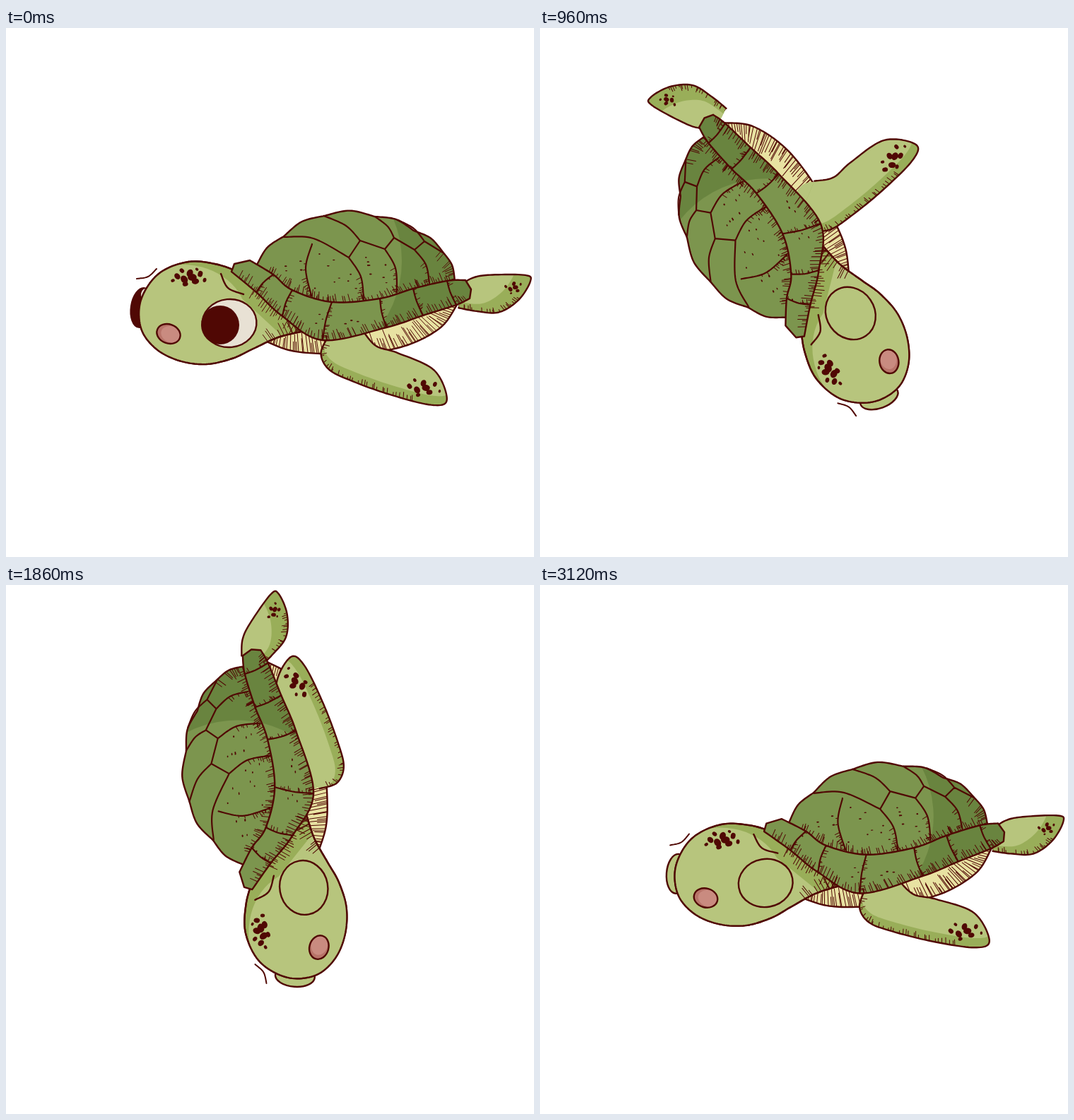
Recreate the animation shown at these times as an HTML page with a canvas. Size 747 px wide and 749 px high, loop 3180 ms.

```html
<!DOCTYPE html>
<html>
<head>
<meta charset="utf-8">
<title>Tumbling turtle</title>
<style>
html, body { margin: 0; width: 100%; height: 100%; overflow: hidden; background: #fff; }
canvas { display: block; }
</style>
</head>
<body>
<canvas id="stage" width="747" height="749"></canvas>
<script>
const ctx = document.getElementById('stage').getContext('2d');
const INK = '#500804', SKIN = '#b7c57d', SKIN_DARK = '#99ae59', SHELL = '#7c954e',
  SHELL_DARK = '#69843f', BELLY = '#e8e2a2', WHITE = '#e8e1d4';
const LOOP = 3180, STEP = 60;

let seed = 7;
const rnd = () => (seed = seed * 16807 % 2147483647) / 2147483647;
const points = s => s.split(',').map(p => p.trim().split(' ').map(Number));

// Smooth curve through a few points, as a dense list of points
function spline(p) {
  const out = [];
  for (let i = 0; i < p.length - 1; i++) {
    const a = p[i - 1] || p[i], b = p[i], c = p[i + 1], d = p[i + 2] || c;
    for (let u = 0; u <= 1; u += 1 / 12)
      out.push([0, 1].map(k => b[k] + u / 2 * (c[k] - a[k]
        + u * (2 * a[k] - 5 * b[k] + 4 * c[k] - d[k] + u * (3 * (b[k] - c[k]) + d[k] - a[k])))));
  }
  return [...out, p.at(-1)];
}
const curve = s => spline(points(s));
const path = line => new Path2D('M' + line.join('L'));

// Row of arcs bulging outwards between the nodes
const scallops = nodes => nodes.slice(1).flatMap(([x, y], i) => {
  const [px, py] = nodes[i], bulge = .11;
  return spline([[px, py], [(px + x) / 2 + (y - py) * bulge, (py + y) / 2 - (x - px) * bulge], [x, y]]);
});

// Pen strokes standing on a part of a line; the sign of len picks the side
function fringe(line, len, from = 0, to = 1, gap = 5) {
  const ink = new Path2D(), last = line.length - 1;
  for (let i = Math.floor(from * last); i < to * last; i++) {
    const [x, y] = line[i], dx = line[i + 1][0] - x, dy = line[i + 1][1] - y;
    const size = Math.hypot(dx, dy);
    for (let n = Math.floor(size / gap + rnd()); n > 0; n--) {
      const u = rnd(), l = len * (.3 + .7 * rnd()) / size;
      ink.moveTo(x + dx * u, y + dy * u);
      ink.lineTo(x + dx * u - dy * l + dx * l * .2, y + dy * u + dx * l + dy * l * .2);
    }
  }
  return ink;
}
function join(...parts) {
  const all = new Path2D();
  parts.forEach(p => all.addPath(p));
  return all;
}
function moved(p, x, y) {
  const copy = new Path2D();
  copy.addPath(p, new DOMMatrix([1, 0, 0, 1, x, y]));
  return copy;
}
function oval(x, y, rx, ry, turn = 0) {
  const p = new Path2D();
  p.ellipse(x, y, rx, ry, turn, 0, 7);
  return p;
}
// Spiral cluster, its spots shrinking outwards
const cluster = (x, y, rx, ry, n, size) => join(...Array.from({ length: n }, (_, i) => {
  const d = Math.sqrt((i + .3) / n), r = size * (1.1 - .75 * i / n);
  return oval(x + rx * d * Math.cos(i * 2.4), y + ry * d * Math.sin(i * 2.4), r * 1.15, r * .9, i);
}));
const flecks = (x, y, w, h, n) => join(...Array.from({ length: n }, () =>
  oval(x + w * rnd(), y + h * rnd(), 1 + rnd(), .6 + rnd() * .6)));

const rearLine = curve('640 366,660 354,685 350,735 351,742 360,725 386,697 403,665 401,640 396');
const bellyLine = curve('362 441,400 456,445 461,510 460,568 449,615 424,638 392');
const headLine = curve('335 348,300 335,258 331,216 348,191 385,191 425,212 454,245 471,283 476,320 468,350 454,385 438,422 429');
const finLine = curve('455 438,446 462,458 484,490 499,545 517,604 530,626 522,607 481,555 458,524 449,505 429');

// The rim's plates lie between paired points of its two edges
const inner = points('345 329,378 349,405 371,461 388,529 383,576 369,624 358,650 357');
const outer = points('319 345,354 374,391 408,448 442,538 424,590 407,637 392,656 383');
const innerLine = spline(inner), outerLine = spline(outer);
const rimSeams = inner.slice(1, -1).map((p, i) => {
  const q = outer[i + 1];
  return spline([p, [(p[0] + q[0]) / 2 - 2, (p[1] + q[1]) / 2 - 1], q]);
});

const domeLine = scallops(points('355 335,393 295,450 266,522 267,577 287,618 317,635 358'));
const ridge = points('485 325,501 301,536 313,549 297,578 314,592 302,618 318');
const ribs = ['433 306,424 340,432 379', '485 325,502 352,506 385', '536 313,551 340,553 374', '578 314,594 335,599 361'].map(curve);
const crests = ['393 296,435 298,485 325', '450 266,481 280,501 301', '522 267,540 281,549 297', '555 272,577 284,592 302'].map(curve);

const rearFin = path(rearLine), belly = path(bellyLine), head = path(headLine), fin = path(finLine);
const dome = path([...domeLine, [560, 385], [430, 400]]);
const rim = path([...innerLine, [658, 370], ...[...outerLine].reverse(), [323, 334], inner[0]]);
const domeSeams = join(...[...ribs, ...crests, ridge].map(path));
const plateSeams = join(...rimSeams.map(path));
const sunlit = oval(395, 330, 165, 160);

const rearHatch = fringe(rearLine, 9, .6);
const bellyHatch = fringe(bellyLine, -30, 0, 1, 3.5);
const neckHatch = join(fringe(headLine, -22, .88), fringe(outerLine, 14, .12, .4, 4));
const finHatch = fringe(finLine, -9, .05, .45);
const domeHatch = join(fringe(innerLine, -13, .1, 1, 4), fringe(domeLine, 18, .8, 1, 4), ...ribs.map(r => fringe(r, 8, .4)));
const rimHatch = join(fringe(outerLine, -15, .05, 1, 4), ...rimSeams.map(s => fringe(s, -7)));

const headSpots = cluster(259, 353, 27, 13, 11, 5);
const finSpots = cluster(591, 506, 27, 13, 9, 4.5);
const rearSpots = cluster(718, 368, 14, 9, 7, 3);
const shellFlecks = flecks(390, 315, 150, 55, 22);
const rimFlecks = flecks(430, 400, 80, 22, 7);

function fill(p, color = INK) {
  ctx.fillStyle = color;
  ctx.fill(p);
}
function line(p, width = 2.4) {
  ctx.lineWidth = width;
  ctx.stroke(p);
}
function shape(p, color, light, lightColor, detail) {
  fill(p, color);
  ctx.save();
  ctx.clip(p);
  if (light) fill(light, lightColor);
  if (detail) line(detail, 1);
  ctx.restore();
  line(p);
}
function turned(x, y, degrees, draw) {
  ctx.save();
  ctx.translate(x, y);
  ctx.rotate(degrees * Math.PI / 180);
  ctx.translate(-x, -y);
  draw();
  ctx.restore();
}

// A slow drift throughout, with a soft-edged fast spin in between
const soft = (x, w) => x < -w ? 0 : x > w ? x : (x + w) ** 2 / (4 * w);
const spin = t => .067 * t + .378 * (soft(t - 492, 220) - soft(t - 1833, 110));
const bump = (t, mid, width) => Math.exp(-(((t - mid) / width) ** 2));
const finSwing = t => 70 * bump(t, 1180, 610) - 64 * bump(t, 2000, 350);
const rearSwing = t => 42 * bump(t, 2000, 560) - 35 * bump(t, 930, 480);

function drawHead(open) {
  shape(oval(192, 396, 15, 28, .15), open ? INK : SKIN);
  if (open) fill(oval(197, 378, 6, 9), WHITE);
  shape(head, SKIN_DARK, moved(head, -26, 12), SKIN, neckHatch);
  // The light copy is shifted off the lit cheek, so light that side again
  ctx.save();
  ctx.clip(head);
  fill(oval(250, 410, 90, 75), SKIN);
  ctx.restore();
  line(head);
  fill(headSpots);
  shape(oval(316, 418, 38.5, 34, -.1), open ? WHITE : SKIN);
  if (open) fill(oval(303, 420.5, 27, 27.5));
  shape(oval(230, 433, 17, 13.5, .35), '#b87469', oval(234, 434, 15, 11.5, .35), '#c98b80');
  line(path(curve('304 348,314 368,336 377')));
  line(path(curve('185 355,201 352,213 341')), 2);
}

function drawTurtle(t) {
  const open = t < 720;
  turned(660, 375, rearSwing(t), () => {
    shape(rearFin, SKIN_DARK, moved(rearFin, -22, -13), SKIN, rearHatch);
    fill(rearSpots);
  });
  shape(belly, BELLY, null, null, bellyHatch);
  drawHead(open);
  turned(476, 446, finSwing(t), () => {
    fill(oval(482, 440, 24, 24), SKIN);
    shape(fin, SKIN_DARK, moved(fin, 3, -13), SKIN, finHatch);
    fill(finSpots);
  });
  shape(dome, SHELL_DARK, sunlit, SHELL, domeHatch);
  fill(shellFlecks);
  line(domeSeams, 2.2);
  shape(rim, SHELL_DARK, sunlit, SHELL, rimHatch);
  fill(rimFlecks);
  line(plateSeams, 2.2);
}

function frame() {
  const t = Math.floor(performance.now() % LOOP / STEP) * STEP;
  ctx.clearRect(0, 0, 747, 749);
  ctx.strokeStyle = INK;
  ctx.lineCap = ctx.lineJoin = 'round';
  turned(373.5, 374.5, spin(t), () => drawTurtle(t));
  requestAnimationFrame(frame);
}
frame();
</script>
</body>
</html>
```
